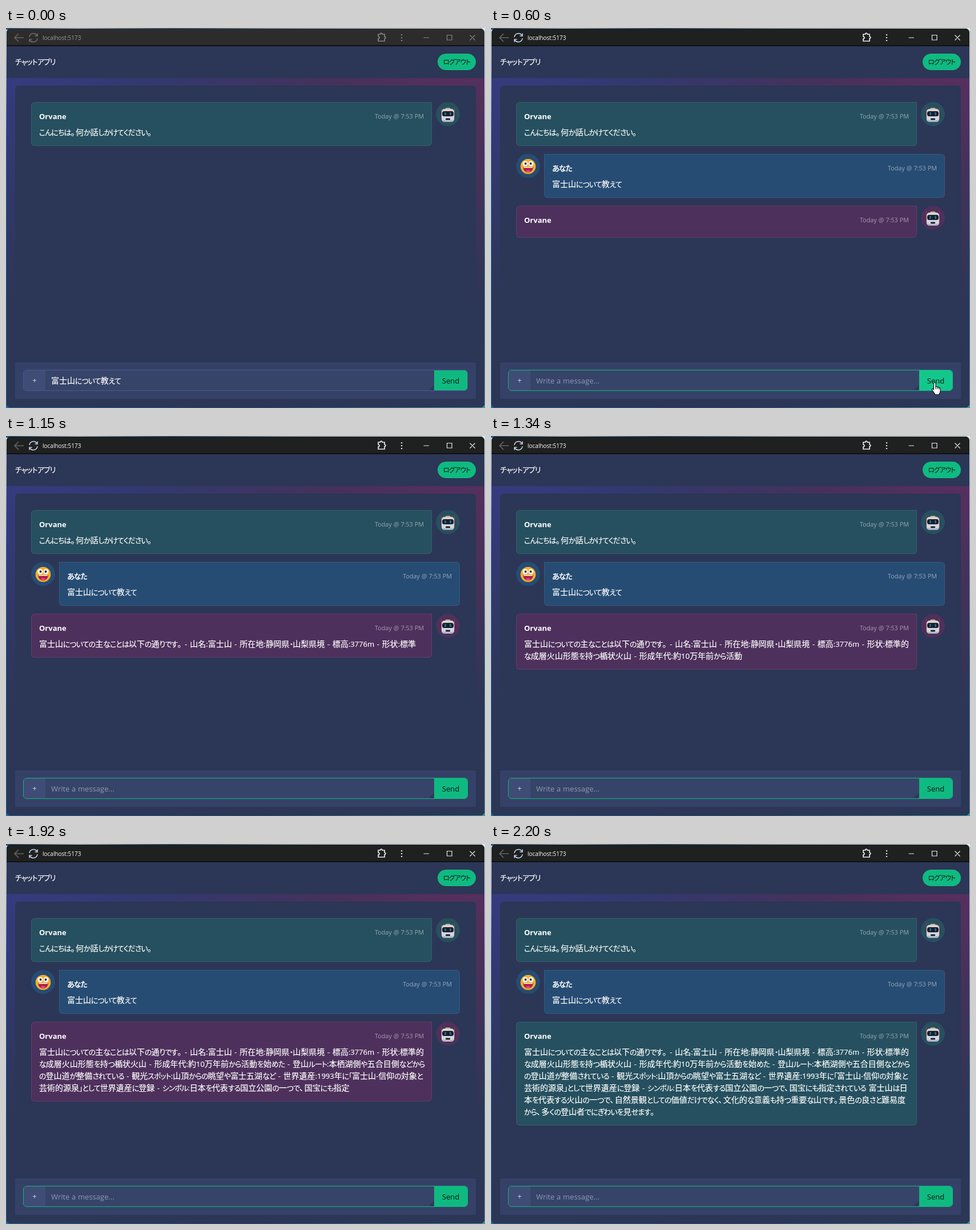
Write an HTML page that moves like this. It is 839 by 667 pixels and loops after 2.67 s.

```html
<!DOCTYPE html>
<html lang="ja">
<head>
<meta charset="utf-8">
<title>チャットアプリ</title>
<style>
html, body { margin: 0; width: 100%; height: 100%; overflow: hidden; }
body {
  --surface: #2c3656; --primary: #0fba81;
  font: 14px/21px "Open Sans", "Noto Sans CJK JP", "Noto Sans CJK", sans-serif;
  color: #fff;
}
div, svg, b { position: absolute; box-sizing: border-box; }
.kana { font-size: .92em; line-height: 0; letter-spacing: -.065em; font-feature-settings: "palt"; }
.stop { line-height: 0; letter-spacing: .1em; font-feature-settings: "palt"; }
.latin { font-size: .93em; line-height: 0; }

#stage {
  left: 0; top: 0; width: 839px; height: 667px; overflow: hidden;
  background: linear-gradient(90deg, #1c5c98, #b9d3e4 15%, #2a6fa8 35%, #a9c6da 60%, #dfe9ee) 0 0 / 100% 3px no-repeat,
    linear-gradient(90deg, #1d6a9e, #174a6c 50%, #3f9c95) 0 100% / 100% 3px no-repeat,
    linear-gradient(#dce8f2, #2a6fbd 30%, #1c5ea0 70%, #1d6a9e) 0 0 / 50% 100% no-repeat,
    linear-gradient(#e4ecf0, #8fa9bd 35%, #2f8f8a 60%, #62889a);
}
#window { left: 1px; top: 1px; width: 837px; height: 665px; border-radius: 7px; background: #111; overflow: hidden; }
#page {
  left: 0; top: 31px; width: 837px; height: 634px;
  background: radial-gradient(at 0 0, rgba(79,70,229,.32) 0, transparent 50%),
    radial-gradient(at 98% 1%, rgba(212,25,118,.28) 0, transparent 50%), var(--surface);
}
#bar { left: 0; top: 0; width: 837px; height: 29px; background: #2c2c2c; }
#url { left: 64px; top: 7px; font-size: 10px; color: #999; }
#chrome { left: 0; top: 0; color: #858585; --reload: #6f6f6f; --back: #666; }
.active #bar { background: #1f2020; }
.active #url { color: #fff; }
.active #chrome { color: #e8eaed; --reload: #c3d3ea; --back: #62666a; }

#header { left: 1px; top: 32px; width: 837px; height: 56px; background: var(--surface); }
#title { left: 16px; top: 48px; }
#title, .text, #field { font-weight: 500; white-space: pre; -webkit-text-stroke: .2px; }
#logout {
  left: 756px; top: 45px; width: 67px; height: 29px; border-radius: 15px; background: var(--primary);
  color: #04130e; font-size: 12.5px; line-height: 29px; text-align: center;
}
#panel { left: 16px; top: 101px; width: 807px; height: 482px; border-radius: 6px; background: var(--surface); }
#card { left: 16px; top: 587px; width: 807px; height: 64px; background: #354167; }
#group {
  left: 30px; top: 600px; width: 779px; height: 37px; border: 1px solid #495a8f; border-radius: 6px;
  background: #374469; overflow: hidden; line-height: 35px;
}
.focus #group { border-color: var(--primary); }
#plus { left: 0; width: 38px; height: 35px; background: #3f4c76; text-align: center; color: #d5d9e5; font-size: 13px; }
#field { left: 48px; }
#field.empty { color: #8e98b3; -webkit-text-stroke: 0; font-weight: 400; }
#send { left: 719px; width: 58px; height: 35px; background: var(--primary); color: #04130e; text-align: center; }
.hover #send { background: #13c78c; }

.row { left: 0; width: 839px; }
.bubble { left: 44px; width: 702px; height: 100%; border: 1px solid rgba(255,255,255,.08); border-radius: 6px 0 6px 6px; }
.mine .bubble { left: 93px; border-radius: 0 6px 6px 6px; }
.bubble b { left: 13px; top: 13px; }
.time { right: 13px; top: 13px; font-size: 11.6px; opacity: .5; }
.text { left: 13px; top: 41px; word-spacing: 1px; }
.avatar { left: 753px; top: 0; width: 42px; height: 42px; border-radius: 50%; }
.mine .avatar { left: 44px; }
.green > * { background-color: #26505f; }
.blue > * { background-color: #264c73; }
.pink > * { background-color: #4e305c; }
</style>
</head>
<body>
<svg width="0" height="0">
  <symbol id="robot" viewBox="0 0 42 42">
    <path d="M9.500 9v19M32.500 9v19" stroke="#a03a45" stroke-width="1"/>
    <rect x="16.500" y="10" width="9" height="3" rx="1.500" fill="#d9a25c"/>
    <rect x="10" y="12" width="22" height="23" rx="5" fill="#d3d5df"/>
    <path d="M11 31q10 4 20 0q-1 4-5 4H16q-4 0-5-4" fill="#abaebd"/>
    <rect x="11" y="16" width="20" height="9" rx="3.500" fill="#1b2028"/>
    <path d="M16.500 19v3M25.500 19v3" stroke="#1f72ad" stroke-width="2.400" stroke-linecap="round"/>
    <rect x="17" y="28.500" width="8" height="3" rx="1" fill="#1b2028"/>
  </symbol>
  <symbol id="smiley" viewBox="0 0 42 42">
    <circle cx="21" cy="22" r="13.300" fill="#f9ad2c"/>
    <g fill="#fff"><circle cx="16" cy="17" r="4.500"/><circle cx="26" cy="17" r="4.500"/></g>
    <g fill="#222"><circle cx="16.500" cy="17" r="2"/><circle cx="25.500" cy="17" r="2"/></g>
    <path d="M12 23h18q-1 9.500-9 9.500t-9-9.500" fill="#a81f4e"/>
    <path d="M13 23h16l-.4 1.500H13.400" fill="#fff"/>
    <path d="M16 30q5-3 10 0q-5 3.500-10 0" fill="#ee5574"/>
  </symbol>
</svg>
<div id="stage">
  <div id="window"><div id="bar"></div><div id="page"></div></div>
  <svg id="chrome" width="839" height="32" fill="none" stroke="currentColor" stroke-width="1.200">
    <path d="M31 17H15m7-7l-7 7l7 7" stroke="var(--back)" stroke-width="1.600"/>
    <path d="M41 16a7.200 7.200 0 0 1 13-3.500m1-3v4.500h-4.500M55 18a7.200 7.200 0 0 1-13 3.500m-1 3V20h4.500" stroke="var(--reload)" stroke-width="1.600"/>
    <path d="M652 11h3.500a1.800 1.800 0 0 1 3.600 0h3.900v4a1.800 1.800 0 0 1 0 3.600V23h-11v-4a2 2 0 0 0 0-4z" stroke-width="1.700"/>
    <path d="M693 11v2m0 3v2m0 3v2" stroke-width="2.200"/>
    <path d="M731.500 17h9.500M772.500 12.500h8.500v8.500h-8.500zM812.500 12.500l9 9m0-9l-9 9"/>
  </svg>
  <div id="url">localhost:5173</div>
  <div id="header"></div>
  <div id="title" data-text="チャットアプリ"></div>
  <div id="logout" data-text="ログアウト"></div>
  <div id="panel"></div>
  <div id="card"></div>
  <div id="group">
    <div id="plus">+</div>
    <div id="field"></div>
    <svg style="left:710px;top:27px" width="9" height="8" stroke="#10141f"><path d="M1 7.500l7-7M5 7.500l3-3"/></svg>
    <div id="send" data-text="Send"></div>
  </div>
  <svg id="cursor" width="18" height="24" viewBox="0 0 18 24">
    <path d="M4.500 14V3a1.700 1.700 0 0 1 3.400 0v6q2.600-1.200 3 .6q2.400-.8 2.800.8q2.300-.4 2.300 2v3.500q0 3-2 5v1.600H6.500V21Q4 18 1.600 14.500q-.8-2 .9-2.100q1 .2 2 1.600" fill="#fff" stroke="#111" stroke-width="1.100"/>
    <path d="M8 9v4m3-3v3m2.800-2.500v3" stroke="#111"/>
  </svg>
</div>
<script>
const LOOP = 2670, TICK = 66;
const ACTIVATE = 530, REPLY = 600, CURSOR_OUT = 800, DONE = 2200;
const QUESTION = '富士山について教えて';

// [arrival time, streamed text]
const STREAM = [
  [940, '富士山についての主なことは'],
  [1010, '以下の通りです。 - 山名:富士山 - 所在地:'],
  [1150, '静岡県・山梨県境 - 標高:3776m - 形状:標準'],
  [1210, '的\nな成層火山形態'],
  [1280, 'を持つ楯状火山 - 形成'],
  [1340, '年代:約10万年前から活動'],
  [1480, 'を始めた - 登山ルート:本'],
  [1550, '栖湖側や五合目側などから\nの登山'],
  [1610, '道が整備されている - 観光スポット:山頂'],
  [1680, 'からの眺望や富士五湖など - 世界遺産:1993年'],
  [1740, 'に「富士山-信仰の対象と\n芸術的源泉」として世界遺産'],
  [1870, 'に登録 - シンボル:日本を代表する国立公園の一つで、国宝にも指定'],
  [1990, 'されている 富士山は日\n本を代表する火山の一つで、自'],
  [2060, '然景観としての価値だけでなく、文化的な意義'],
  [DONE, 'も持つ重要な山です。景色の良さと難易度\nから、多くの登山者でにぎわいを見せます。'],
];

const $ = id => document.getElementById(id);
const stage = $('stage'), field = $('field'), cursor = $('cursor');

// Kana and Latin are set slightly smaller than kanji, full stops and commas a little wider.
const rich = text => text.replace(/([、。]+)|([\u3003-\u30ff]+)|[!-~]+/g,
  (run, stop, kana) => `<span class="${stop ? 'stop' : kana ? 'kana' : 'latin'}">${run}</span>`);

function setText(el, text) {
  if (el.shown === text) return;
  el.shown = text;
  el.innerHTML = rich(text);
}

function addMessage(top, kind, name, face) {
  const row = document.createElement('div');
  row.style.top = top + 'px';
  row.innerHTML = `<div class="bubble"><b>${rich(name)}</b><div class="time">${rich('Today @ 7:53 PM')}</div>
<div class="text"></div></div><svg class="avatar"><use href="#${face}"/></svg>`;
  stage.insertBefore(row, cursor);
  const body = row.querySelector('.text');
  return (text, visible = true, tone = kind) => {
    row.className = 'row ' + tone;
    row.style.visibility = visible ? 'visible' : 'hidden';
    row.style.height = 56 + (text ? 21 * text.split('\n').length : 0) + 'px';
    setText(body, text);
  };
}

document.querySelectorAll('[data-text]').forEach(el => setText(el, el.dataset.text));
const greeting = addMessage(130, 'green', 'Orvane', 'robot');
const question = addMessage(221, 'mine blue', 'あなた', 'smiley');
const answer = addMessage(312, 'pink', 'Orvane', 'robot');
greeting('こんにちは。何か話しかけてください。');

function moveCursor(t) {
  const stepped = Math.floor((t + 1) / TICK) * TICK;
  const left = (1 - Math.min(1, stepped / 396)) ** 2;
  cursor.style.left = 771 + 50 * left + 'px';
  cursor.style.top = 621 + 55 * left + 'px';
  cursor.style.visibility = t >= 70 && t < CURSOR_OUT ? 'visible' : 'hidden';
  stage.classList.toggle('hover', t >= 330 && t < CURSOR_OUT);
}

function draw(now) {
  const t = now % LOOP, sent = t >= ACTIVATE;
  stage.classList.toggle('active', sent);
  stage.classList.toggle('focus', t >= REPLY);
  field.className = sent ? 'empty' : '';
  setText(field, sent ? 'Write a message...' : QUESTION);
  question(QUESTION, sent);
  const streamed = STREAM.filter(([at]) => t >= at).map(([, text]) => text).join('');
  answer(streamed, t >= REPLY, t >= DONE ? 'green' : 'pink');
  moveCursor(t);
  requestAnimationFrame(draw);
}
requestAnimationFrame(draw);
</script>
</body>
</html>
```
